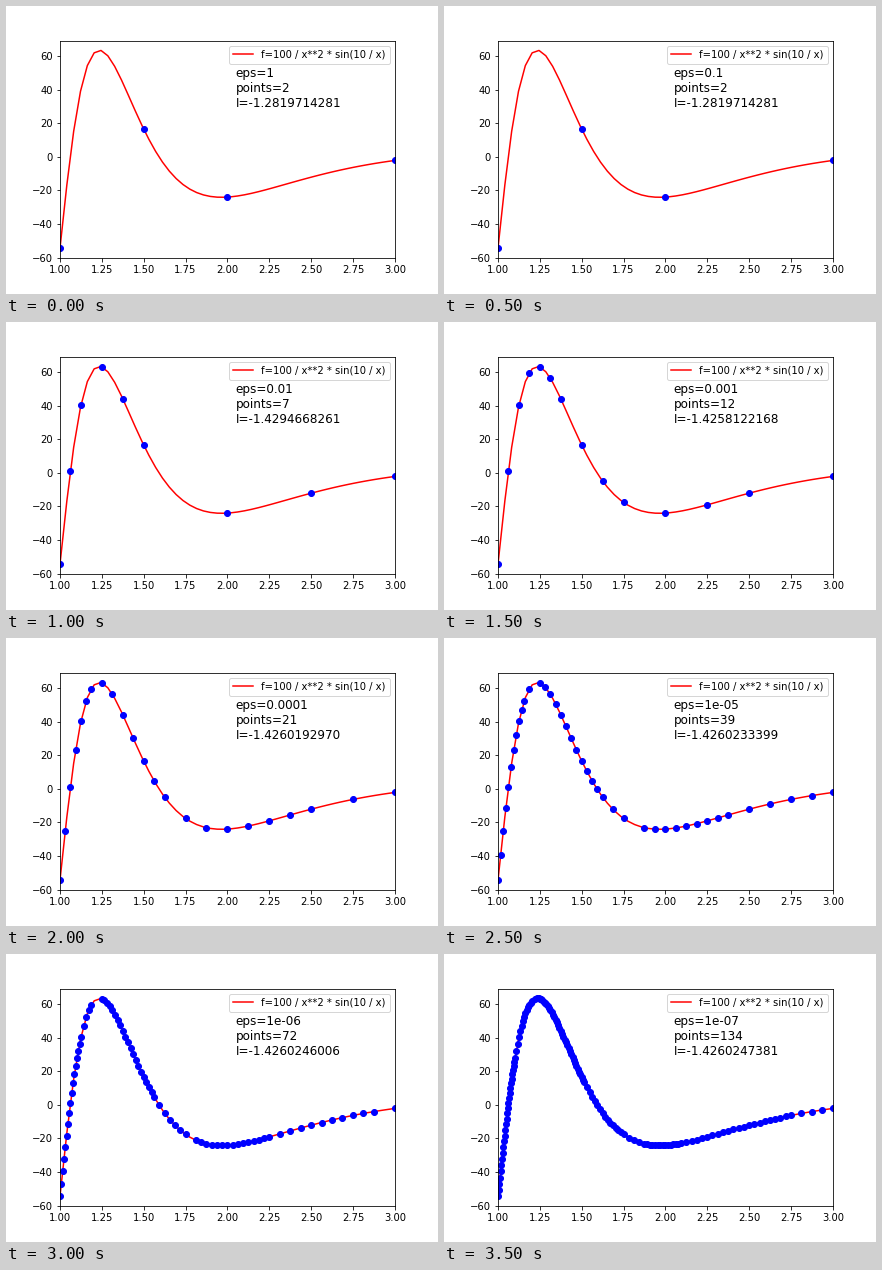
A matplotlib script for the animation above (4000 ms loop, 432 by 288 pixels).

```python
import numpy as np
import matplotlib.pyplot as plt
from matplotlib.animation import FuncAnimation

A, B = 1.0, 3.0

plt.rcParams["font.family"] = "DejaVu Sans"
plt.rcParams["font.size"] = 10


def f(x):
    return 100 / x**2 * np.sin(10 / x)


def simpson(a, b):
    return (b - a) / 6 * (f(a) + 4 * f((a + b) / 2) + f(b))


def integrate(a, b, eps):
    """Adaptive Simpson rule: the integral and the inner split points."""
    mid = (a + b) / 2
    halves = simpson(a, mid) + simpson(mid, b)
    if abs(halves - simpson(a, b)) < 15 * eps:
        return halves, []
    left, left_pts = integrate(a, mid, eps / 2)
    right, right_pts = integrate(mid, b, eps / 2)
    return left + right, left_pts + [mid] + right_pts


fig, ax = plt.subplots(figsize=(6, 4), dpi=72)
fig.subplots_adjust(left=0.125, right=0.9, bottom=0.125, top=0.88)

xs = np.linspace(A, B, 50)
ax.plot(xs, f(xs), "r-", lw=1.5, label="f=100 / x**2 * sin(10 / x)")
ax.set_xlim(A, B)
ax.set_xticks(np.arange(A, B + 0.1, 0.25))
ax.set_ylim(ax.get_ylim())
ax.legend(loc="upper right")

dots, = ax.plot([], [], "bo", ms=6)
info = ax.text(2.05, 30, "", fontsize=12)


def update(i):
    eps = 10.0 ** -i
    total, inner = integrate(A, B, eps)
    pts = np.array([A, *inner, B])
    dots.set_data(pts, f(pts))
    info.set_text(f"eps={eps:g}\npoints={len(inner)}\nI={total:.10f}")
    return dots, info


anim = FuncAnimation(fig, update, frames=8, interval=500, repeat=True)
plt.show()
```
